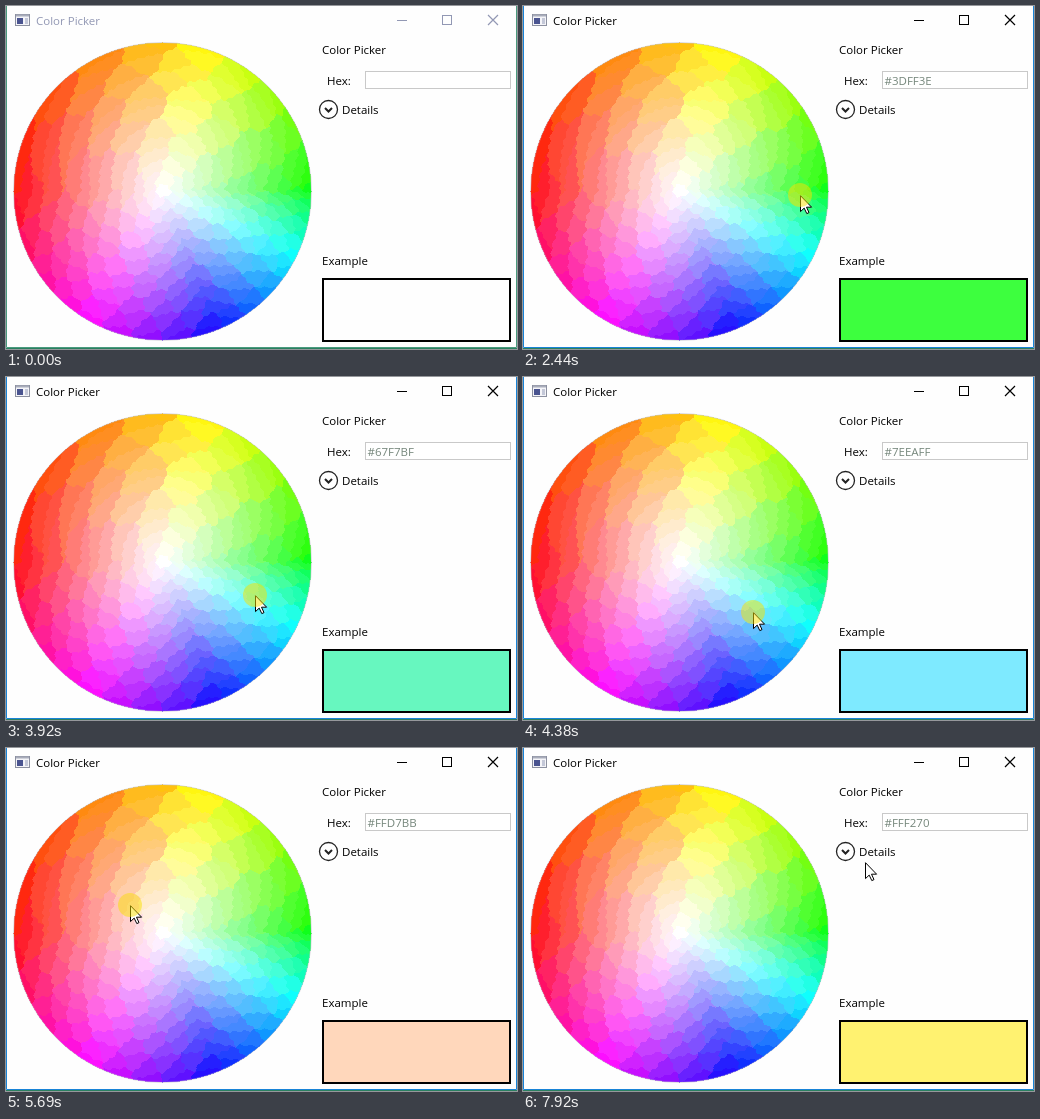
Animation of 511 by 343 pixels, one loop 8000 ms. Source, as an HTML page with a canvas:

```html
<!DOCTYPE html>
<html lang="en">
<head>
<meta charset="utf-8">
<title>Color Picker</title>
<style>
  html, body { margin: 0; width: 100%; height: 100%; overflow: hidden; background: #fefefe; }
  canvas, svg { position: absolute; left: 0; top: 0; width: 511px; height: 343px; }
  text { font: 11.5px "Open Sans", "Noto Sans", sans-serif; fill: #000; }
  #hex { fill: #76877c; }
  svg { --ink: #000; --edge: #1883d7; }
  svg.idle { --ink: #9298b4; --edge: #4a9a7e; }
  .title { fill: var(--ink); }
  .buttons { stroke: var(--ink); fill: none; }
</style>
</head>
<body>
<canvas id="wheel" width="511" height="343"></canvas>
<svg id="win" class="idle" viewBox="0 0 511 343">
  <circle cx="156.5" cy="185.5" r="149" fill="none" stroke="#c4c4cc" stroke-opacity=".6"/>

  <path d="M0 342.5H511" stroke="#2b8060"/>
  <path d="M.5 0V341.5H510.5V0" fill="none" style="stroke:var(--edge)"/>

  <rect x="9.5" y="8.5" width="14" height="11" fill="#f4f4f8" stroke="#8c90a0"/>
  <path d="M10 9.5H23" stroke="#a8acba" stroke-width="2"/>
  <rect x="11" y="12" width="6" height="6" fill="#4a5490"/>
  <rect x="19" y="12" width="3" height="6" fill="#c4c8d8"/>
  <text class="title" x="30" y="18.5">Color Picker</text>
  <g class="buttons">
    <path d="M391 14.5H401"/>
    <rect x="436.5" y="9.5" width="9" height="9"/>
    <path d="M482 9L492 19M492 9L482 19" stroke-width="1.2"/>
  </g>

  <text x="316" y="48">Color Picker</text>
  <text x="321" y="79">Hex:</text>
  <rect x="359.5" y="65.5" width="145" height="17" fill="#fff" stroke="#c9c9c9"/>
  <text id="hex" x="361.5" y="79"></text>
  <circle cx="322.5" cy="103.5" r="9" fill="#fff" stroke="#222" stroke-width="1.3"/>
  <path d="M319 102L322.5 105.5L326 102" fill="none" stroke="#222" stroke-width="2"/>
  <text x="336" y="108">Details</text>
  <text x="316" y="259">Example</text>
  <rect id="swatch" x="317" y="273" width="187" height="62" stroke="#000" stroke-width="2"/>

  <g id="pointer">
    <path d="M.5 .7V16.6L4.2 13.1L6.8 18.6L9 17.6L6.5 12.2H11.6Z" fill="#fff" stroke="#000"/>
    <circle id="press" r="12" fill="#fae100" fill-opacity=".5"/>
  </g>
</svg>
<script>
const $ = id => document.getElementById(id);
const LOOP = 8000, STEP = 76.95;

// ---- colour wheel ----
const CX = 157, CY = 184.5, RADIUS = 149, MAX_SAT = 0.94;

const hsv = (hue, sat) => [5, 3, 1].map(n => {
  const k = (n + hue / 60) % 6;
  return 255 * (1 - sat * Math.max(0, Math.min(k, 4 - k, 1)));
});

// Red at the left, green at the right, blue at the bottom
function wheelColor(x, y) {
  const dx = x - CX, dy = y - CY;
  const turn = Math.atan2(dy, dx) / Math.PI;
  const hue = turn < 0 ? 120 * (turn + 1) ** 1.35 : 120 + 240 * turn ** 0.72;
  return hsv(hue, MAX_SAT * Math.min(1, Math.hypot(dx, dy) / RADIUS) ** 1.1);
}

function makePalette(rings) {
  let seed = 7;
  const jitter = size => ((seed = seed * 16807 % 2147483647) / 2147483647 - 0.5) * size;
  const colors = [hsv(0, 0)];
  for (let ring = 1; ring <= rings; ring++) {
    const count = 7 + Math.round(ring * 1.4);
    for (let i = 0; i < count; i++) {
      const hue = (i + ring * 0.38 + jitter(0.4)) * 360 / count + 360;
      colors.push(hsv(hue % 360, MAX_SAT * Math.min(1, (ring + jitter(0.3)) / rings)));
    }
  }
  return colors;
}

function drawWheel() {
  const palette = makePalette(14);
  const ctx = $('wheel').getContext('2d');
  const img = ctx.createImageData(300, 300);
  for (let y = 0; y < 300; y++) for (let x = 0; x < 300; x++) {
    if (Math.hypot(x - 149, y - 150) > RADIUS) continue;
    const [r, g, b] = wheelColor(x + 7.5 + Math.sin(y * 0.7 + x * 0.2),
                                 y + 35.5 + Math.sin(x * 0.6 - y * 0.25));
    let best = palette[0], min = Infinity;
    for (const p of palette) {
      const d = (p[0] - r) ** 2 + (p[1] - g) ** 2 + (p[2] - b) ** 2;
      if (d < min) { min = d; best = p; }
    }
    img.data.set([...best, 255], (y * 300 + x) * 4);
  }
  ctx.putImageData(img, 7, 35);
}

// ---- pointer ----
// Smooth curve through rows of [step, value, value, ...]
function spline(rows, step) {
  const last = rows.length - 1;
  let i = 0;
  while (i < last - 1 && rows[i + 1][0] <= step) i++;
  const p = [i - 1, i, i + 1, i + 2].map(n => rows[Math.min(last, Math.max(0, n))]);
  const f = Math.min(1, Math.max(0, (step - p[1][0]) / (p[2][0] - p[1][0])));
  return p[1].map((_, n) => {
    const [a, b, c, d] = p.map(row => row[n]);
    return b + f / 2 * (c - a + f * (2 * a - 5 * b + 4 * c - d + f * (3 * (b - c) + d - a)));
  }).slice(1);
}

// Drag: step, x, y, picked colour
const DRAG = [
  [0, 277, 189, 0x3DFF3E],
  [6, 265, 198, 0x52FF6B],
  [19, 230, 235, 0x7EEAFF],
  [23, 166, 240, 0xC0B4FF],
  [27, 142, 222, 0xFFD1FE],
  [34, 120, 171, 0xFFD4CC],
  [44, 158, 103, 0xFFE672],
  [47, 175, 103, 0xFFF270]
].map(([s, x, y, c]) => [s, x, y, c >> 16, c >> 8 & 255, c & 255]);

const MOVES = [
  { start: 500, rows: [[0, 260, -8], [5, 254, 40]] },
  { start: 1130, rows: [[0, 254, 40], [4, 293, 95], [6, 303, 139], [9, 277, 189]] },
  { start: 3000, rows: DRAG },
  { start: 7380, rows: [[0, 175, 103], [8, 342, 114]] }
];

const stepAt = (t, start) => Math.max(0, Math.floor((t - start) / STEP + 0.1) + 1);
const toHex = v => Math.round(Math.min(255, Math.max(0, v))).toString(16).padStart(2, '0');

function render(t) {
  const move = MOVES.filter(m => t >= m.start).pop() || MOVES[0];
  const [x, y] = spline(move.rows, stepAt(t, move.start)).map(Math.round);
  const active = t >= 2440;
  const pressed = active && t < 6770 && !(t >= 2610 && t < 2680);
  $('pointer').setAttribute('transform', `translate(${x} ${y})`);
  $('pointer').style.display = t < 500 ? 'none' : '';
  $('press').style.display = pressed ? '' : 'none';
  $('win').setAttribute('class', active ? '' : 'idle');

  const rgb = spline(DRAG, stepAt(t, 3000)).slice(2);
  const hex = active ? '#' + rgb.map(toHex).join('').toUpperCase() : '';
  $('hex').textContent = hex;
  $('swatch').setAttribute('fill', hex || '#fefefe');
}

drawWheel();
const t0 = performance.now();
function tick() {
  render((performance.now() - t0) % LOOP);
  requestAnimationFrame(tick);
}
tick();
</script>
</body>
</html>
```
